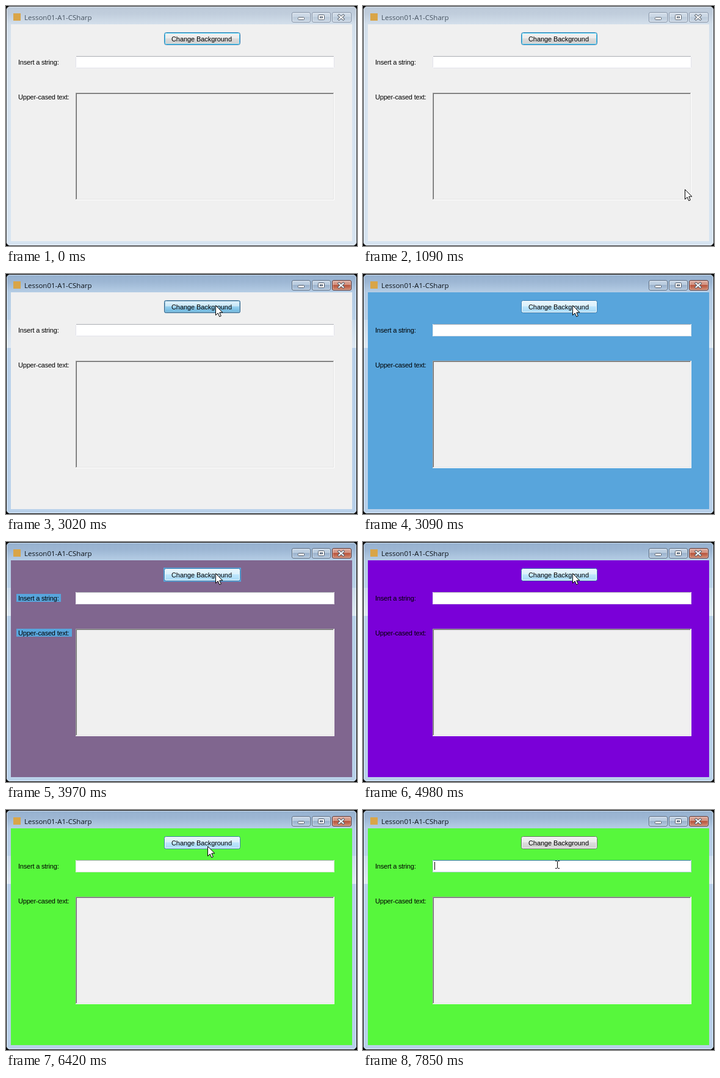
Write an HTML page that moves like this. It is 575 px wide and 393 px high and loops after 8 s.

```html
<!DOCTYPE html>
<html lang="en">
<head>
<meta charset="utf-8">
<title>Change Background</title>
<style>
  html, body { margin: 0; width: 100%; height: 100%; overflow: hidden; background: #000; }
  svg { display: block; width: 575px; height: 393px; }
  text { font: 11px "Liberation Sans", Arial, sans-serif; letter-spacing: -0.2px; }
  .title { font: 11.5px "Open Sans", "Noto Sans", sans-serif; letter-spacing: 0; }
</style>
</head>
<body>
<svg id="stage" viewBox="0 0 575 393"></svg>
<script>
const LOOP = 8000;
const BLUE = '#58a5dc';

// Vertical gradient from [offset, colour] pairs.
const gradient = (id, ...stops) =>
  `<linearGradient id="${id}" x2="0" y2="1">${stops.map(([offset, color]) =>
    `<stop offset="${offset}" stop-color="${color}"/>`).join('')}</linearGradient>`;

// Glossy face: two gradients meeting at the middle.
const gloss = (id, a, b, c, d) => gradient(id, [0, a], [.5, b], [.5, c], [1, d]);

const rect = (x, y, w, h, fill, extra = '') =>
  `<rect x="${x}" y="${y}" width="${w}" height="${h}" fill="${fill}" ${extra}/>`;

const outline = (x, y, w, h, fill, stroke, r = 0, extra = '') =>
  rect(x + .5, y + .5, w - 1, h - 1, fill, `stroke="${stroke}" rx="${r}" ${extra}`);

function captionButton(x, width, face, border) {
  return outline(x, 10, width, 17, `url(#${face})`, border, 2.5) +
    outline(x + 1, 11, width - 2, 15, 'none', '#fff', 1.5, 'stroke-opacity=".4"');
}

function windowFrame(id, { edge, body, face, close, border, closeBorder, glyph, title }) {
  const cross = 'M545.5 15.5l7 6m0-6l-7 6';
  return `<g id="${id}">` +
    outline(0, 0, 575, 393, `url(#${body})`, edge, 6) +
    outline(1, 1, 573, 391, 'none', '#fff', 5, 'stroke-opacity=".55"') +
    captionButton(468, 31, face, border) +
    captionButton(501, 31, face, border) +
    captionButton(534, 32, close, closeBorder) +
    outline(478, 18, 11, 5, '#fff', glyph, 1) +
    outline(511, 14, 11, 9, '#fff', glyph, 1) +
    outline(514, 17, 5, 3, face === 'capOn' ? '#a9bed5' : '#c6d3e2', glyph) +
    `<path d="${cross}" stroke="${glyph}" stroke-width="4" stroke-linecap="square"/>` +
    `<path d="${cross}" stroke="#fff" stroke-width="2" stroke-linecap="square"/>` +
    `<text class="title" x="30" y="23" fill="${title}">Lesson01-A1-CSharp</text></g>`;
}

const pushButton = (id, face, border, inner) =>
  `<g id="${id}">` + outline(259, 43, 125, 21, `url(#${face})`, border, 3) +
  outline(260, 44, 123, 19, 'none', inner, 2) + '</g>';

const textBorder = (id, top, side) =>
  `<g id="${id}">` + outline(114, 82, 424, 20, 'none', side, 1) +
  rect(115, 82, 422, 1, top) + '</g>';

const stage = document.getElementById('stage');
stage.innerHTML = '<defs>' +
  gradient('bodyOff', [0, '#bdcad9'], [.03, '#c0cddc'], [.075, '#d3dfeb'], [.2, '#d8e4f0'], [1, '#d7e4f1']) +
  gradient('bodyOn', [0, '#97b2d0'], [.03, '#9cb6d3'], [.075, '#b5cde5'], [.19, '#b9d1e8'],
    [.19, '#cbdcec'], [.307, '#dfe9f3'], [.307, '#b9d1ea'], [1, '#b9d1ea']) +
  gloss('capOff', '#d3deea', '#c8d5e3', '#bccbdb', '#cbd8e6') +
  gloss('capOn', '#c8d7e7', '#b5c8dc', '#9bb2cc', '#b4cae1') +
  gloss('closeOn', '#dfb0a4', '#d08b79', '#b9543c', '#d28d74') +
  gloss('plain', '#f2f2f2', '#ebebeb', '#dddddd', '#cfcfcf') +
  gloss('hotFace', '#eaf6fd', '#d9f0fc', '#bee6fd', '#a7d9f5') +
  gloss('downFace', '#e5f4fc', '#c4e5f6', '#98d1ef', '#68b3db') +
  '</defs>' +
  windowFrame('inactive', { edge: '#35383c', body: 'bodyOff', face: 'capOff', close: 'capOff',
    border: '#8492a6', closeBorder: '#8492a6', glyph: '#5d6672', title: '#465361' }) +
  windowFrame('active', { edge: '#000', body: 'bodyOn', face: 'capOn', close: 'closeOn',
    border: '#5a6b80', closeBorder: '#5c2a24', glyph: '#505a68', title: '#0c1218' }) +
  rect(12, 12, 12, 12, '#d9a548') +
  rect(8, 30, 559, 355, '#f0f0f0', 'id="client"') +
  `<g id="stale">` + rect(17, 85, 73, 13, BLUE) + rect(17, 142, 91, 13, BLUE) +
  rect(258, 42, 127, 23, BLUE) + '</g>' +
  '<text x="20" y="96">Insert a string:</text><text x="20" y="153">Upper-cased text:</text>' +
  rect(114, 82, 424, 20, '#fff') +
  textBorder('boxPlain', '#abadb3', '#e2e3ea') +
  textBorder('boxHover', '#5794bf', '#c5daed') +
  textBorder('boxFocus', '#3d7bad', '#b5cfe7') +
  rect(117, 85, 1, 13, '#000', 'id="caret"') +
  rect(114, 142, 424, 176, '#fff') + rect(114, 142, 423, 175, '#a0a0a0') +
  rect(115, 143, 422, 174, '#e3e3e3') + rect(115, 143, 421, 173, '#696969') +
  rect(116, 144, 420, 172, '#f0f0f0') +
  pushButton('normal', 'plain', '#707070', '#fbfbfb') +
  pushButton('default', 'plain', '#3c7fb1', '#3fcbf3') +
  pushButton('hot', 'hotFace', '#3c7fb1', '#f8fcfe') +
  pushButton('down', 'downFace', '#2c628b', '#8fb9d0') +
  '<text x="271" y="58" style="letter-spacing:-.08px">Change Background</text>' +
  '<path id="arrow" d="M.5.5v16l3.7-3.5 2.5 5.8 2.6-1.1-2.5-5.7h5z" fill="#fff" stroke="#000"/>' +
  '<path id="beam" d="M-3 -5.5h2.5l1 1 1-1H4M-3 6.5h2.5l1-1 1 1H4M.5-5V6" fill="none" stroke="#000"/>';

const part = id => document.getElementById(id);
const show = (id, amount) => { part(id).style.opacity = Number(amount); };
const within = (t, from, to) => t >= from && t < to;
const clamp = v => Math.max(0, Math.min(1, v));

// Hover glow that fades in after `from` and out after `to`.
const glow = (t, from, to, fadeIn = 200, fadeOut = 300) =>
  Math.min(clamp((t - from) / fadeIn), clamp(1 - (t - to) / fadeOut));

// Pointer hot spot: time, x, y.
const path = [
  [130, 559, 385], [200, 556, 379], [270, 554, 378], [340, 557, 386],
  [610, 562, 383], [760, 562, 383], [1100, 525, 295], [1350, 484, 192], [1580, 454, 125],
  [1650, 445, 119], [1850, 398, 88], [1990, 371, 70], [2200, 352, 58], [2410, 344, 52],
  [2480, 343, 51], [5240, 343, 51], [5450, 335, 76], [5660, 330, 89], [5930, 330, 89],
  [6140, 330, 66], [6280, 330, 59], [6830, 330, 59], [6970, 327, 63], [7240, 327, 63],
  [7450, 325, 78], [7650, 318, 89], [8000, 318, 89]
];

function pointerAt(t) {
  const i = path.findIndex(p => p[0] > t);
  const [t0, x0, y0] = path[i - 1], [t1, x1, y1] = path[i];
  const k = (t - t0) / (t1 - t0);
  return [Math.round(x0 + (x1 - x0) * k), Math.round(y0 + (y1 - y0) * k)];
}

const backgrounds = [[0, '#f0f0f0'], [3090, BLUE], [3970, '#80668f'], [4980, '#7a00d8'], [6420, '#57f73c']];
const presses = [[3020, 3090], [3900, 3970], [4840, 4980], [6350, 6420]];

function draw(t) {
  const isActive = t >= 3020, boxFocused = t >= 7650;
  show('active', isActive);
  show('inactive', !isActive);
  part('client').setAttribute('fill', backgrounds.findLast(b => t >= b[0])[1]);
  show('stale', within(t, 3970, 4040));

  show('normal', boxFocused);
  show('default', !boxFocused);
  show('hot', Math.max(glow(t, 2060, 5330), glow(t, 6150, 7300)));
  show('down', presses.some(p => within(t, ...p)));

  show('boxHover', Math.max(glow(t, 1760, 1920, 130), glow(t, 5480, 6000, 180), glow(t, 7480, LOOP)));
  show('boxFocus', boxFocused);
  show('caret', boxFocused);

  const visible = within(t, 130, 410) || t >= 610;
  const step = 1990 + Math.floor((t - 1990) / 70) * 70;
  const [x, y] = pointerAt(Math.max(130, step));
  const overBox = y >= 82 && y < 102 && x >= 114 && x < 538;
  show('arrow', visible && !overBox);
  show('beam', visible && overBox);
  for (const id of ['arrow', 'beam']) part(id).setAttribute('transform', `translate(${x} ${y})`);
}

const start = performance.now();
function tick() {
  draw((performance.now() - start) % LOOP);
  requestAnimationFrame(tick);
}
tick();
</script>
</body>
</html>
```
